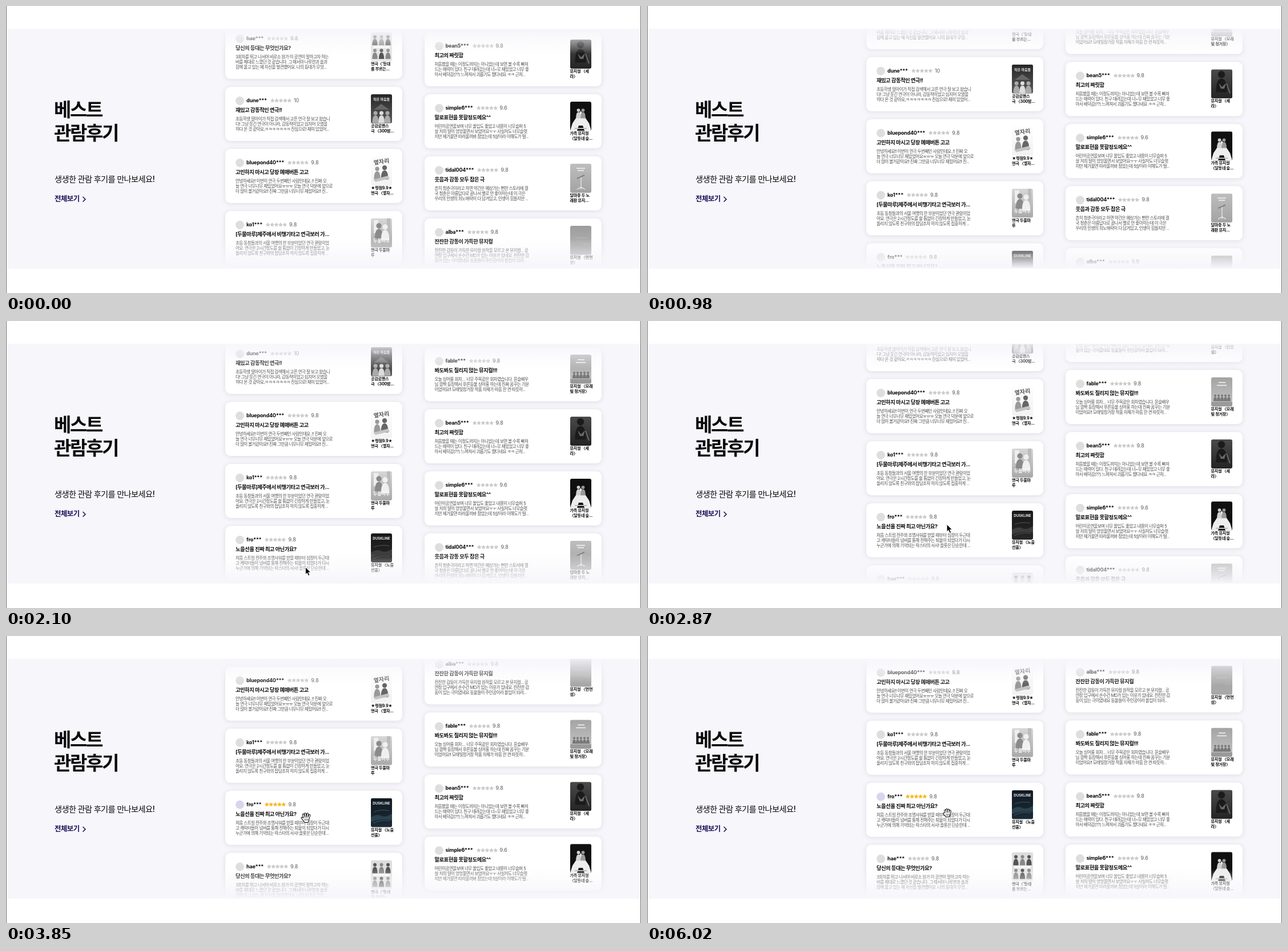
An HTML page that plays this animation: 1112 px wide and 504 px high, repeating every 6160 ms.

```html
<!DOCTYPE html>
<html lang="ko">
<head>
<meta charset="utf-8">
<title>베스트 관람후기</title>
<style>
html, body { margin: 0; width: 100%; height: 100%; overflow: hidden; background: #fff; }
#stage {
  position: relative; width: 1112px; height: 504px; overflow: hidden; background: #fff;
  font-family: Inter, "Noto Sans CJK KR", "Noto Sans CJK", sans-serif; color: #0a0a0a;
}
#stage > *, .card > * { position: absolute; white-space: nowrap; }
.edge { top: 0; width: 1px; height: 504px; background: #77706f; }
.band { left: 1px; top: 40px; width: 1110px; height: 421px; background: #f6f6fb; }
h1 { left: 84px; top: 162px; margin: 0; font-size: 33px; line-height: 41px; letter-spacing: -2.4px; font-weight: 700; }
.lead { left: 85px; top: 294px; font-size: 14.2px; line-height: 20px; letter-spacing: -.6px; font-weight: 500; }
.more { left: 85px; top: 329px; font-size: 12.4px; line-height: 20px; letter-spacing: -.5px; font-weight: 700; color: #1d1155; }
.slider { left: 0; top: 40px; width: 1112px; height: 421px; overflow: hidden; }
.fade { left: 372px; width: 684px; }
.fade.top { top: 40px; height: 44px; background: linear-gradient(#f6f6fbea, #f6f6fb00); }
.fade.low { top: 409px; height: 52px; background: linear-gradient(#f6f6fb00, #f6f6fb); }
.card {
  position: absolute; top: -40px; width: 310px; height: 95px; border-radius: 9px;
  background: #fff; box-shadow: 0 1px 8px rgba(45, 45, 65, .13);
}
.avatar { left: 18px; top: 16.5px; width: 15px; height: 15px; border-radius: 50%; background: #dedede; }
.head { left: 37px; top: 17px; height: 14px; display: flex; align-items: center; line-height: 14px; }
.head b { font-size: 9px; letter-spacing: -.2px; }
.head svg { width: 37px; height: 8px; margin: 0 4px 0 6px; fill: #cbcbcb; }
.head span { font-size: 9px; color: #5c5c5c; }
.title { left: 18px; top: 34px; font-size: 9.3px; line-height: 14px; letter-spacing: -.5px; font-weight: 700; }
.body { left: 18px; top: 51.5px; font-size: 7.5px; line-height: 9px; letter-spacing: -.54px; color: #4d4d4d; }
.poster { left: 255px; top: 13px; width: 37px; height: 51px; border-radius: 3px; overflow: hidden; filter: grayscale(1); }
.label { left: 255px; top: 64px; font-size: 7.1px; line-height: 9px; letter-spacing: -.25px; font-weight: 700; }
.on .poster { filter: none; }
.on .head svg { fill: #f7b91f; }
.on .avatar { background: #d9d4f0; }
.cursor { left: 0; top: 0; width: 24px; height: 24px; overflow: visible; }
</style>
</head>
<body>
<div id="stage">
  <div class="band"></div>
  <h1>베스트<br>관람후기</h1>
  <div class="lead">생생한 관람 후기를 만나보세요!</div>
  <div class="more">전체보기</div>
  <svg style="left:133px;top:334px" width="8" height="11" fill="none" stroke="#1d1155" stroke-width="1.5"><path d="M1.5 1L6 5.4L1.5 9.8"/></svg>
  <div class="slider" id="slider"></div>
  <div class="fade top"></div>
  <div class="fade low"></div>
  <div class="edge" style="left:0"></div>
  <div class="edge" style="left:1111px"></div>
  <svg class="cursor" id="arrow"><path d="M0 0V13.2L3 10.5L5.2 15.4L7.6 14.3L5.4 9.6H9.4Z" fill="#000" stroke="#fff"/></svg>
  <svg class="cursor" id="open"></svg>
  <svg class="cursor" id="fist"></svg>
</div>
<script>
const LOOP = 6160, STEP = 70, PITCH = 109, RING = PITCH * 5;
const HOVER_AT = 3010, GRAB_AT = 4340;
const $ = id => document.getElementById(id);

// Poster drawing helpers, on a 37 x 51 field
const rect = (x, y, w, h, c) => `<rect x="${x}" y="${y}" width="${w}" height="${h}" fill="${c}"/>`;
const dot = (x, y, r, c) => `<circle cx="${x}" cy="${y}" r="${r}" fill="${c}"/>`;
const shape = (d, c) => `<path d="${d}" fill="${c}"/>`;
const line = (d, c, w = 1) => `<path d="${d}" stroke="${c}" stroke-width="${w}" fill="none"/>`;
const words = (s, y, size, c) =>
  `<text x="18.5" y="${y}" font-size="${size}" font-weight="700" fill="${c}" text-anchor="middle">${s}</text>`;
const person = (x, y, k, c) => dot(x, y, 2.6 * k, c) +
  shape(`M${x - 4 * k} ${y + 13 * k}Q${x - 4 * k} ${y + 3 * k} ${x} ${y + 3 * k}T${x + 4 * k} ${y + 13 * k}Z`, c);
const row = (n, draw) => Array.from({ length: n }, (_, i) => draw(i)).join('');
let gradients = 0;
const wash = (a, b) => {
  const id = 'wash' + gradients++;
  return `<linearGradient id="${id}" x2="0" y2="1"><stop stop-color="${a}"/><stop offset="1" stop-color="${b}"/></linearGradient>`
    + rect(0, 0, 37, 51, `url(#${id})`);
};

const left = [
  { name: 'hae***', score: '9.8', title: '당신의 등대는 무엇인가요?',
    body: ['3회차를 뛰고 나서야 비로소 원가 이 공연이 말하고자 하는', '바를 제대로 느꼈던 것 같습니다. 그 때서야 나루한과 솔과', '함께 울고 있는 제 자신을 발견했어요. 나의 등대가 무엇...'],
    label: ['연극〈‘등대', '를 부르는...'],
    art: () => wash('#dcdcdc', '#e8e8e8') + row(6, i => person(7 + i % 3 * 11.5, 8 + (i > 2) * 24, 1.15, i % 2 ? '#888' : '#555')) + rect(4, 24, 29, 4, '#f7f7f7') },
  { name: 'dune***', score: '10', title: '재밌고 감동적인 연극!!',
    body: ['초등학생 딸아이가 직접 검색해서 고른 연극 잘 보고 왔습니', '다! 그냥 웃긴 연극이 아니라, 감동적이었고 심지어 오열을', '하다 온 것 같아요,ㅋㅋㅋㅋㅋㅋㅋ 진심으로! 재미 있었어...'],
    label: ['공감로맨스', '극 〈300밤...'],
    art: () => wash('#262626', '#5c5c5c') + words('작은 마음들', 11, 6, '#eee') + shape('M5 27L18 17L32 27Z', '#666') + row(3, i => person(8 + i * 10.5, 33, 1.35, i == 1 ? '#ddd' : '#aaa')) },
  { name: 'bluepond40***', score: '9.8', title: '고민하지 마시고 당장 예매버튼 고고',
    body: ['안녕하세요!! 이번이 연극 두번째인 사람인데요..!! 진짜 오', '늘 연극 너무너무 재밌었어요ㅠㅠㅠ 오늘 연극 덕분에 앞으로', '더 많이 볼거같아요!! 진짜 그만큼 너무너무 재밌어요!! 진...'],
    label: ['★평점9.9★', '연극 〈옆자...'],
    art: () => wash('#fdfdfd', '#f2f2f2') + `<g transform="rotate(-8 18 10)">${words('옆자리', 13, 10, '#555')}</g>` + person(11, 22, 1.4, '#999') + person(24, 20, 1.6, '#666') + shape('M4 41L30 34L33 39L8 45Z', '#c4c4c4') },
  { name: 'ko1***', score: '9.8', title: '[두물마루]제주에서 비행기타고 연극보러 가...',
    body: ['초등 동창들과의 서울 여행의 한 부분이었던 연극 관람이었', '어요. 연극은 2시간정도를 쉴 틈없이 긴장하게 만들었고, 눈', '돌리지 않도록 친구와의 잡담조차 하지 않도록 집중하게 ...'],
    label: ['연극 두물마', '루'],
    art: () => wash('#d7d7d7', '#a9a9a9') + rect(5, 3, 8, 23, '#eee') + rect(28, 0, 6, 30, '#bbb') + person(14, 13, 1.8, '#8a8a8a') + person(25, 15, 1.8, '#f0f0f0') + words('두물마루', 42, 8, '#f8f8f8') },
  { name: 'fro***', score: '9.8', title: '노을선율 진짜 최고 아닌가요?',
    body: ['처음 스트링 전주와 조명샤워를 받을 때부터 심장이 두근대', '고 캐릭터들이 넘버를 통해 전해주는 퇴물이 되었다가 다시', '누군가에 의해 기억되는 락스타의 서사! 플롯은 단순한데 ...'],
    label: ['뮤지컬 〈노을', '선율〉'],
    art: () => wash('#111a22', '#1b2a36') + words('DUSKLINE', 11, 6, '#e9eef0') + shape('M0 34Q10 27 18 31T37 27V39Q20 35 0 42Z', '#2b414e') + line('M5 24Q18 19 32 22M4 44Q18 37 33 40', '#40596a') }
];

const right = [
  { name: 'bean5***', score: '9.8', title: '최고의 짜릿함',
    body: ['처음봤을 때는 이정도까지는 아니었는데 보면 볼 수록 빠져', '드는 매력이 있다. 친구 데려갔는데 너~무 재밌었고 너무 좋', '아서 배덕감(??) 느껴져서 괴롭기도 했다네요 ㅋㅋ 근처...'],
    label: ['뮤지컬 〈세', '라〉'],
    art: () => wash('#4a4a4a', '#242424') + person(18, 9, 2.4, '#1b1b1b') + shape('M13 24L19 31L26 24L23 34H17Z', '#6a6a6a') + line('M27 25L33 42', '#777', 1.5) },
  { name: 'simple6***', score: '9.6', title: '말로표현을 못할정도에요^^',
    body: ['어린이공연을보며 너무 몰입도 좋았고 내용이 너무슬퍼 5', '살 저희 딸이 엉엉울면서 보았어요ㅜㅜ 사실저도 너무슬펏', '지만 제가울면 따라울까봐 참았는데 5살이라 이해도가 떨...'],
    label: ['가족 뮤지컬', '〈달동네 숲...'],
    art: () => rect(0, 0, 37, 51, '#101010') + shape('M18.5 16L4 38L0 51H12L15 42H22L25 51H37L33 38Z', '#ededed') + person(14.5, 15, 1.1, '#d0d0d0') + person(22.5, 15, 1.1, '#999') + rect(8, 46, 21, 2, '#bbb') },
  { name: 'tidal004***', score: '9.8', title: '웃음과 감동 모두 잡은 극',
    body: ['흔히 청춘극이라고 하면 약간은 예상가는 뻔한 스토리에 결', '국 청춘은 아름답다로 끝나서 별로 안 좋아하는데 이 극은', '우리의 인생의 희노애락이 다 담겨있고, 인생이 힘들지만 ...'],
    label: ['달마중 두 노', '래판 뮤지...'],
    art: () => wash('#bdbdbd', '#a3a3a3') + rect(11, 7, 15, 2, '#e6e6e6') + rect(13, 11, 11, 2, '#e6e6e6') + line('M19 22V45M12 45L19 41L26 45', '#eee', 1.2) + line('M12 26L25 20', '#777', 1.8) },
  { name: 'alba***', score: '9.8', title: '잔잔한 감동이 가득한 뮤지컬',
    body: ['잔잔한 감동이 가득한 뮤지컬 원작을 모르고 본 뮤지컬... 공', '연장 입구에서 손수건 MD가 있는 이유가 있네요. 잔잔한 감', '동이 있는 극이였네요 동물들이 주인공이라 몰입이 되려...'],
    label: ['뮤지컬 〈먼먼', '섬〉'],
    art: () => wash('#9c9c9c', '#b9b9b9') + shape('M0 34Q12 29 22 33T37 31V51H0Z', '#a8a8a8') + line('M8 21H29', '#b8b8b8') },
  { name: 'fable***', score: '9.8', title: '봐도봐도 질리지 않는 뮤지컬!!!',
    body: ['오늘 싱어롱 회차.... 너무 주옥같은 회차였습니다. 윤슬배우', '님 깜짝 등장해서 푸른등불 싱어롱 하는데 진짜 꿈꾸는 기분', '이었어요!! 모래빛정거장 작품 자체가 마음 한 켠 따뜻하...'],
    label: ['뮤지컬 〈모래', '빛 정거장〉'],
    art: () => wash('#a4a4a4', '#c4c4c4') + rect(13, 8, 12, 2, '#e4e4e4') + rect(10, 13, 17, 2, '#e4e4e4') + row(5, i => person(7 + i * 6, 32, .75, '#777')) + rect(0, 43, 37, 8, '#9a9a9a') }
];

const star = i => {
  const points = row(10, k => {
    const r = k % 2 ? 2.1 : 4.1, a = k * Math.PI / 5;
    return `${(3.7 + i * 7.4 + r * Math.sin(a)).toFixed(2)},${(4.2 - r * Math.cos(a)).toFixed(2)} `;
  });
  return `<polygon points="${points}"/>`;
};
const stars = `<svg viewBox="0 0 37 8">${row(5, star)}</svg>`;

function addCard(c, x) {
  const el = document.createElement('div');
  el.className = 'card';
  el.style.left = x + 'px';
  el.innerHTML = `<div class="avatar"></div>
    <div class="head"><b>${c.name}</b>${stars}<span>${c.score}</span></div>
    <div class="title">${c.title}</div>
    <div class="body">${c.body.join('<br>')}</div>
    <svg class="poster" viewBox="0 0 37 51">${c.art()}</svg>
    <div class="label">${c.label.join('<br>')}</div>`;
  $('slider').append(el);
  return el;
}
const leftCards = left.map(c => addCard(c, 384));
const rightCards = right.map(c => addCard(c, 732.5));
const hovered = leftCards[4];

// Hands are centred on the origin: a black outline under white fingers
function drawHand(el, fingers, palm) {
  el.innerHTML = `<g stroke-linecap="round" stroke-linejoin="round" fill="none">
    <path d="${fingers}" stroke="#000" stroke-width="3.8"/>
    <path d="${palm}" stroke="#000" stroke-width="2" fill="#fff"/>
    <path d="${palm}" fill="#fff"/>
    <path d="${fingers}" stroke="#fff" stroke-width="1.8"/>
    <path d="M-1.5 2V5M1 2V5M3.5 2V5" stroke="#000" stroke-width=".7"/></g>`;
}
drawHand($('open'), 'M-2.6 1L-4.4-5M-.3 0L-1.2-6.8M2.4 0L2.8-6.4M4.6 1L6.2-4M-3.5 4L-6.7 .6', 'M-4 0H5.5L5 4L3.5 8H-2L-5 3Z');
drawHand($('fist'), 'M-2.6 1L-3.5-4M-.3 0L-.6-5.6M2.3 0L2.6-5.2M4.6 1L5.4-3.2M-3.5 3.4L-5.4 1.2', 'M-4 0H5.5L5 3.5L3.5 6.8H-2L-4.6 3Z');

// Tables of [time, value]
const scroll = [[0, 0], [980, 52.3], [2100, 109], [2870, 149], [3430, 176], [4130, 211.3]];
const pointerX = [[1750, 524], [2870, 525], [3430, 524.5], [4130, 525.5]];
const pointerY = [[1750, 467], [1890, 441], [2100, 432], [2870, 357], [3430, 331.5], [4130, 310.5]];

function at(table, t) {
  if (t <= table[0][0]) return table[0][1];
  const i = table.findIndex(p => p[0] >= t);
  if (i < 0) return table[table.length - 1][1];
  const [t0, a] = table[i - 1], [t1, b] = table[i];
  return a + (b - a) * (t - t0) / (t1 - t0);
}

function place(cards, start) {
  cards.forEach((el, i) => {
    const y = ((start + PITCH * i + 84) % RING + RING) % RING - 84;
    el.style.transform = `translateY(${y.toFixed(2)}px)`;
  });
}

function show(id, visible, x, y) {
  $(id).style.display = visible ? '' : 'none';
  $(id).style.transform = `translate(${x}px, ${y}px)`;
}

function draw() {
  const t = Math.floor(performance.now() % LOOP / STEP) * STEP;
  const s = at(scroll, t), x = at(pointerX, t), y = at(pointerY, t);
  place(leftCards, 33 - s);
  place(rightCards, 46 + s);
  hovered.classList.toggle('on', t >= HOVER_AT);
  show('arrow', t >= 1750 && t < HOVER_AT, x, y);
  show('open', t >= HOVER_AT && t < GRAB_AT, x, y);
  show('fist', t >= GRAB_AT, x, y);
  requestAnimationFrame(draw);
}
draw();
</script>
</body>
</html>
```
